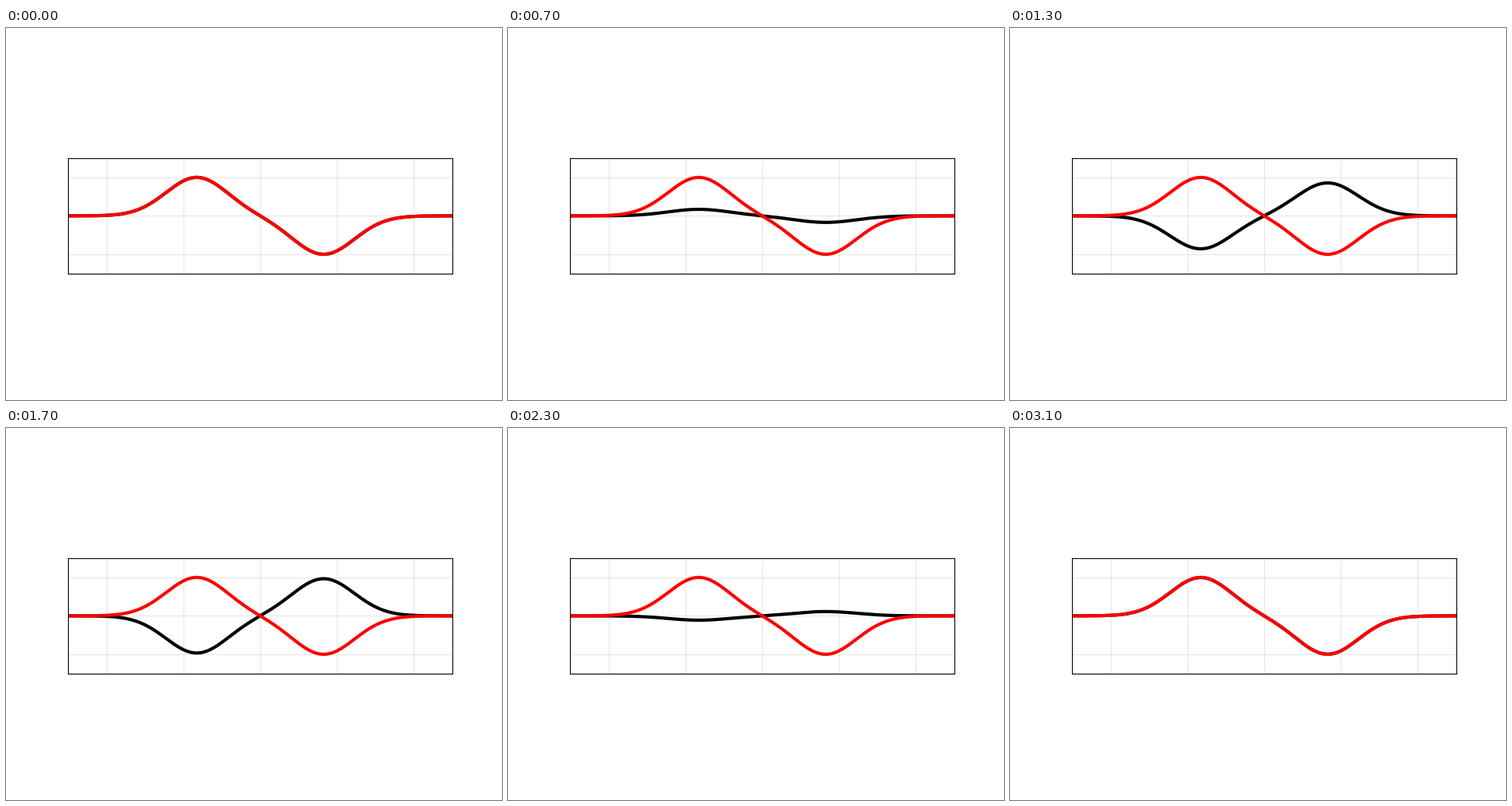
A matplotlib script for the animation above (3200 ms loop, 640 by 480 pixels).

```python
import numpy as np
import matplotlib.pyplot as plt
from matplotlib.animation import FuncAnimation

FRAMES = 32
INTERVAL = 100   # ms
STEP = 0.2       # phase advance per frame, radians
CENTRE = 1.65
SIGMA = 0.8


def bump(x, centre):
    return np.exp(-((x - centre) ** 2) / (2 * SIGMA ** 2))


x = np.linspace(-5, 5, 501)
shape = bump(x, -CENTRE) - bump(x, CENTRE)

fig, ax = plt.subplots(figsize=(6.4, 4.8), dpi=100)
ax.set_aspect("equal")
ax.set_xlim(-5, 5)
ax.set_ylim(-1.5, 1.5)
ax.set_xticks(range(-4, 5, 2))
ax.set_yticks([-1, 0, 1])
ax.tick_params(length=0, labelbottom=False, labelleft=False)
ax.grid(alpha=0.3)

wave, = ax.plot(x, shape, color="black", lw=3)
ax.plot(x, shape, color="red", lw=3)


def update(i):
    wave.set_ydata(np.cos(STEP * i) * shape)
    return wave,


anim = FuncAnimation(fig, update, frames=FRAMES, interval=INTERVAL,
                     repeat=True, repeat_delay=0)
plt.show()
```
